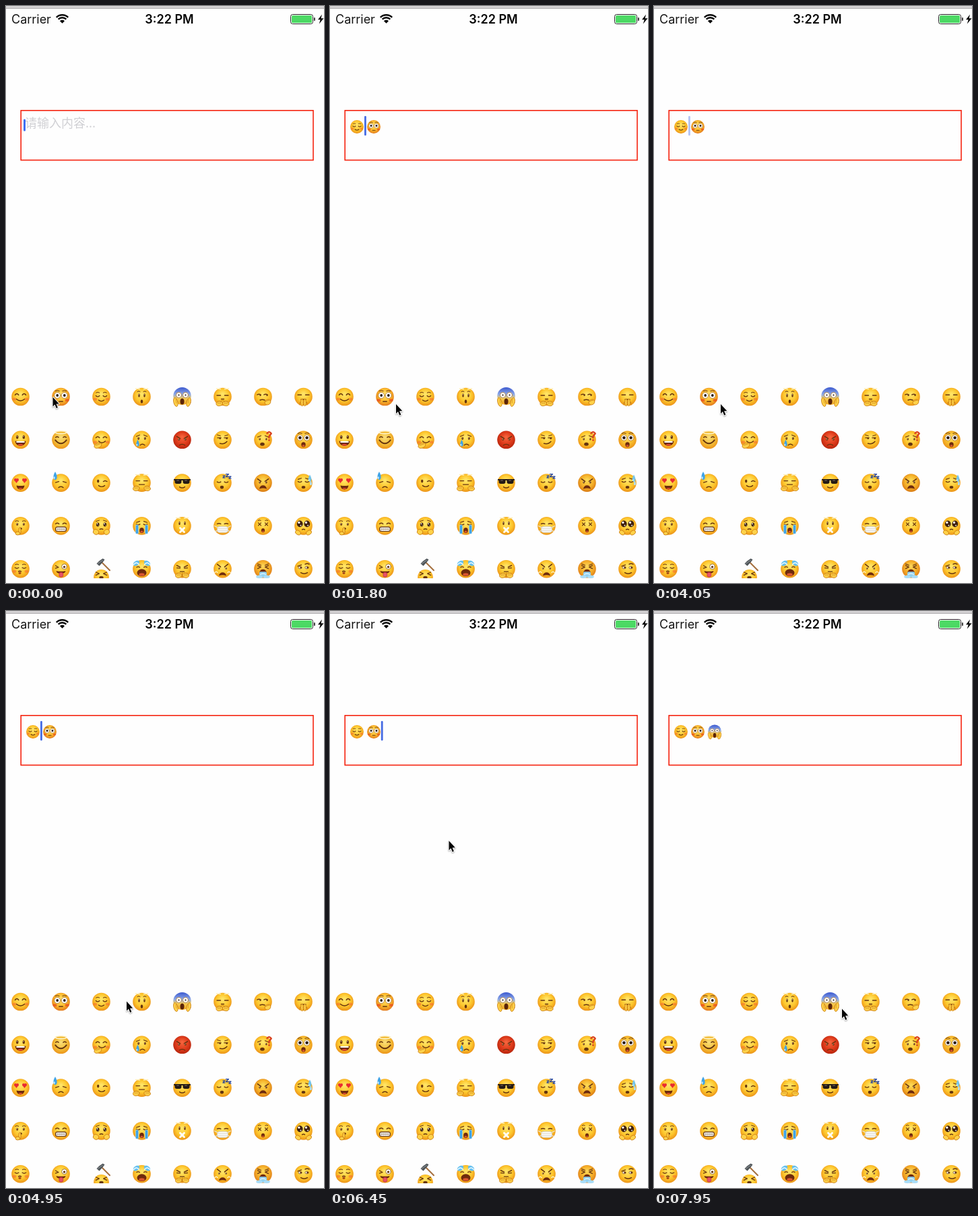
Animation, 472 px wide and 855 px high, one loop 8000 ms. Source, as an HTML page with a canvas:

```html
<!DOCTYPE html>
<html lang="zh">
<head>
<meta charset="utf-8">
<title>Emoji input</title>
<style>
html, body { margin: 0; width: 472px; height: 855px; overflow: hidden; background: #fefefe; }
canvas { display: block; }
</style>
</head>
<body>
<canvas id="stage" width="472" height="855"></canvas>
<script>
const W = 472, H = 855, LOOP = 8000, STEP = 150;
const stage = document.getElementById('stage');
let c = stage.getContext('2d');
const INK = '#65340f', MOUTH = '#6e2a0d', RIM = '#c97c12', SKIN = '#ffd24a', BLUE = '#3fa3e6', PALE = '#a9dcf7';

// drawing helpers
const twice = f => [-1, 1].forEach(f);
function blob(x, y, rx, ry, fill, edge, w = 0.8, rot = 0) {
  c.beginPath();
  c.ellipse(x, y, rx, ry, rot, 0, Math.PI * 2);
  if (fill) { c.fillStyle = fill; c.fill(); }
  if (edge) { c.strokeStyle = edge; c.lineWidth = w; c.stroke(); }
}
function trace(pts) {
  c.beginPath();
  for (let i = 0; i < pts.length; i += 2) c.lineTo(pts[i], pts[i + 1]);
}
function line(color, w, ...pts) {
  trace(pts);
  c.strokeStyle = color; c.lineWidth = w; c.stroke();
}
function poly(color, ...pts) {
  trace(pts);
  c.closePath(); c.fillStyle = color; c.fill();
}
function curve(x, y, w, sag, color = INK, lw = 1.4) {
  c.beginPath();
  c.moveTo(x - w, y);
  c.quadraticCurveTo(x, y + 2 * sag, x + w, y);
  c.strokeStyle = color; c.lineWidth = lw; c.stroke();
}
function bar(x, y, w, h, r, fill, edge, lw = 1) {
  c.beginPath();
  c.roundRect(x, y, w, h, r);
  if (fill) { c.fillStyle = fill; c.fill(); }
  if (edge) { c.strokeStyle = edge; c.lineWidth = lw; c.stroke(); }
}
function text(s, x, y, font, color, align = 'left') {
  c.font = font; c.fillStyle = color; c.textAlign = align;
  c.fillText(s, x, y);
}

// face parts
function head(inner = '#ffe467', mid = '#fdc62c', rim = '#ec9419', y = 0, r = 13.3) {
  const g = c.createRadialGradient(0, y - 4, 1, 0, y - 1, r + 1);
  g.addColorStop(0, inner); g.addColorStop(0.62, mid); g.addColorStop(1, rim);
  blob(0, y, r, r, g);
}
const dots = (rx = 1.6, ry = 2.4, y = -3, dx = 4.8) => twice(s => {
  blob(s * dx, y, rx, ry, INK);
  blob(s * dx - 0.4, y - ry * 0.4, 0.5, 0.6, '#fff');
});
const lids = (sag, y = -2.5, dx = 5.4, w = 2.7) => twice(s => curve(s * dx, y, w, sag));
const brows = (y, tilt = 0, w = 1.2) => twice(s => line(INK, w, s * 3, y + tilt, s * 8, y - tilt));
const arches = (y, w = 2.5) => twice(s => curve(s * 5.3, y, w, -0.8, INK, 1));
const goggle = (r, pupil, y = -2, dx = 5.3) => twice(s => {
  blob(s * dx, y, r, r, '#fff', '#a8702a', 0.8);
  blob(s * dx, y, pupil, pupil, '#2a1a10');
});
const glossy = (rx, ry, y) => twice(s => {
  blob(s * 5.3, y, rx, ry, '#41220f');
  blob(s * 5.3 - rx * 0.3, y - ry * 0.4, rx * 0.36, ry * 0.34, '#fff');
  blob(s * 5.3 + rx * 0.3, y + ry * 0.5, rx * 0.2, ry * 0.2, '#fff');
});
const blush = (color = 'rgba(245,95,50,.5)', y = 3.5) => twice(s => blob(s * 9, y, 3, 2, color));
const hand = (x, y, rx, ry, rot = 0) => blob(x, y, rx, ry, SKIN, RIM, 0.9, rot);
const open = (y, rx, ry) => {
  blob(0, y, rx, ry, MOUTH);
  blob(0, y + ry * 0.5, rx * 0.6, ry * 0.38, '#d9552f');
};
function grin(y, w, h, teeth = true) {
  c.beginPath();
  c.moveTo(-w, y);
  c.quadraticCurveTo(0, y + 1, w, y);
  c.bezierCurveTo(w * 0.9, y + h * 1.3, -w * 0.9, y + h * 1.3, -w, y);
  c.fillStyle = MOUTH; c.fill();
  blob(0, y + h * 0.75, w * 0.45, h * 0.2, '#d9452f');
  if (teeth) bar(-w * 0.8, y + 0.5, w * 1.6, 2, 1, '#fff');
}
// downturned open mouth, resting on y
function snarl(y, w, h) {
  c.beginPath();
  c.moveTo(-w, y);
  c.bezierCurveTo(-w * 0.8, y - h * 1.3, w * 0.8, y - h * 1.3, w, y);
  c.quadraticCurveTo(0, y - h * 0.4, -w, y);
  c.fillStyle = MOUTH; c.fill();
}
function drop(x, y, r, color = BLUE) {
  c.beginPath();
  c.moveTo(x, y - r * 2);
  c.bezierCurveTo(x + r * 2, y + r * 1.5, x - r * 2, y + r * 1.5, x, y - r * 2);
  c.fillStyle = color; c.fill();
  blob(x - r * 0.3, y, r * 0.25, r * 0.4, '#c6ecff');
}
function heart(x, y) {
  twice(s => blob(x + s * 1.5, y - 1, 2, 2, '#e92b32'));
  poly('#e92b32', x - 3.3, y - 0.3, x + 3.3, y - 0.3, x, y + 3.8);
}
const cross = (x, y, r, color, w) => {
  line(color, w, x - r, y - r, x + r, y + r);
  line(color, w, x + r, y - r, x - r, y + r);
};
const squint = y => twice(s => line(INK, 1.3, s * 8, y - 2.2, s * 3.2, y, s * 8, y + 2.2));
const fists = (x = 6, y = 9) => twice(s => {
  hand(s * x, y, 4.8, 3.6, s * 0.2);
  for (let i = -1; i < 2; i++) line(RIM, 0.6, s * x + i * 2, y - 2.4, s * x + i * 2, y + 0.5);
});
const fringe = () => twice(s => line('#fff0b8', 1.5, s * 3, -11.5, s * 9, -12));
const slits = (y = -2) => twice(s => line(INK, 1.4, s * 3, y, s * 8.5, y));
const flat = (y = 5, w = 3) => line(INK, 1.3, -w, y, w, y);

const FACES = [
  // row 1
  () => { head(); blush(); lids(-2); curve(0, 3.5, 6, 2.6); },
  () => {
    head('#ffe06a', '#fcbc2c', '#e37a1c'); blush('rgba(232,60,30,.6)', 5);
    arches(-8.5, 3); goggle(4.5, 1.9); flat(7, 2.8);
  },
  () => { head(); blush(); arches(-6); lids(1.4, -1.5); curve(0, 5, 4, 1.6); },
  () => { head(); fringe(); twice(s => curve(s * 4.5, -7.5, 2, -0.8, INK, 1)); dots(1.3, 2.8, -2, 4); blob(0, 7, 1.8, 2.8, INK); },
  () => {
    const g = c.createLinearGradient(0, -14, 0, 13);
    g.addColorStop(0, '#3c59cf'); g.addColorStop(0.4, '#8fabe8');
    g.addColorStop(0.62, '#f6cb52'); g.addColorStop(1, '#f0a41e');
    blob(0, -1, 13.2, 13, g);
    goggle(4, 1.1, -2.5, 5); blob(0, 7, 3, 4.6, '#5b2409');
    twice(s => { hand(s * 9.6, 8, 3, 6.6, s * 0.25); line(RIM, 0.6, s * 9.3, 3.5, s * 8.8, 9.5); });
  },
  () => { head(); fringe(); slits(); flat(3.5, 2); fists(4.8, 10); line(RIM, 1, -3, 7, 0, 5, 3, 7); },
  () => {
    head(); twice(s => curve(s * 5 - 1, -3, 2.8, -0.8)); blob(-4, -2, 1.2, 1, INK); blob(6, -2, 1.2, 1, INK);
    curve(-1, 5, 3.5, -0.7); hand(7, 8, 4.6, 3.8, -0.5); line(RIM, 0.8, 3, 7, 9, 5);
  },
  () => {
    head(); slits(-2.8); flat(4, 3.5);
    twice(s => hand(s * 2.1, 8.5, 1.8, 5.2)); twice(s => line(RIM, 0.8, s * 5, 8, s * 6, 12));
  },
  // row 2
  () => { head(); dots(1.8, 2.8, -4); grin(1.8, 8, 7.5); },
  () => { head('#f9dc74', '#f2bd38'); blob(0, -11, 8.5, 2, null, '#fff6cf', 1.5); lids(-1, -3.5, 5.6, 2.2); curve(0, 0.5, 8.2, 5, INK, 2); },
  () => { head(); blush(); lids(-1.6, -3); curve(1, 2, 5, 2.5); hand(-5, 8.5, 5.8, 3.6, -0.4); line(RIM, 0.8, -8, 8, -2, 6); },
  () => { head(); brows(-6, -1); dots(1.5, 2, -2); curve(1, 8, 3.4, -1.6); drop(-6, 7.5, 3.8); },
  () => { head('#f5633c', '#dd3a1a', '#b8260e'); brows(-3.4, 1.5, 1.6); dots(1.4, 1.4, -0.4); curve(0, 8, 4, -1.4); },
  () => {
    head(); brows(-6.5, 0.7, 1);
    twice(s => { line(INK, 1.2, s * 5 - 2.7, -3, s * 5 + 2.7, -3); blob(s * 5 + 1.2, -2, 1.3, 1.2, INK); });
    c.beginPath(); c.moveTo(-4, 5.5); c.quadraticCurveTo(3, 7, 6.5, 2.5);
    c.strokeStyle = INK; c.lineWidth = 1.4; c.stroke();
  },
  () => {
    head(); brows(-5, -1); dots(1.3, 1.8, -1); blob(-1, 6.5, 3.3, 2.5, INK);
    curve(9, -9.5, 3, -2.2, '#d9431e', 2.4); line('#d9431e', 2.4, 12, -9, 9, -5, 9, -3); blob(9, 0.5, 1.4, 1.4, '#d9431e');
  },
  () => { head('#ffdf63', '#f6b92b'); arches(-9.5, 3); goggle(4.3, 2.3, -3, 5.1); open(7, 3.2, 3.6); },
  // row 3
  () => { head(); twice(s => heart(s * 6, -3.5)); grin(4, 6, 6, false); },
  () => { head(); twice(s => line(INK, 1.3, s * 3, -2, s * 8, -0.5)); curve(0, 7, 3.5, -1.3); drop(-8.5, -7.5, 4.6); },
  () => { head(); blob(-4.8, -2.5, 1.7, 2.3, INK); line(INK, 1.4, 3, -2, 5.5, -3.2, 8.5, -2); curve(0.5, 4, 4.6, 1.8); },
  () => { head(); fringe(); slits(-3); flat(2.5, 4); fists(8.2, 8.2); },
  () => {
    head(); bar(-12.5, -5.5, 25, 1.8, 0.6, '#241a15');
    twice(s => { bar(s * 6 - 5, -5.5, 10, 7, 3, '#241a15'); line('#86786a', 0.9, s * 6 - 2, -3.5, s * 6 + 1, -3.5); });
    curve(0, 6, 4, 1.4);
  },
  () => {
    head(); lids(1, -1.5); blob(-1, 6.5, 2.7, 2.3, INK);
    [[2, -9, 3], [7, -11, 4], [11, -8, 3]].forEach(([x, y, r]) =>
      line('#26469f', 1.4, x - r / 2, y - r / 2, x + r / 2, y - r / 2, x - r / 2, y + r / 2, x + r / 2, y + r / 2));
  },
  () => { head('#fbd753', '#f5b028', '#da7c14'); brows(-4, 1.8, 1.6); dots(1.4, 1.6, -0.8); snarl(9, 5.5, 5.5); },
  () => { head(); brows(-6, -0.8); lids(1, -2); blob(0, 6.5, 2.8, 2, INK); drop(9.5, -4, 4, '#73c5ec'); drop(11, 2, 2.5, PALE); },
  // row 4
  () => { head(); arches(-7); dots(1.5, 1.9, -2.5); blob(0, 4, 2.4, 1.6, INK); hand(-1, 7.5, 1.7, 5.3); hand(-4, 11, 3.4, 2.5); },
  () => {
    head(); lids(-1.2, -3); bar(-8, 1.5, 16, 6.6, 3, '#fff', INK, 1.1); line('#8d775e', 0.7, -7.5, 4.8, 7.5, 4.8);
    for (let x = -4.5; x < 6; x += 3) line('#8d775e', 0.6, x, 2, x, 7.6);
  },
  () => { head(); brows(-7.5, -0.8, 1); glossy(2.3, 2.8, -2); curve(0, 5, 2.3, -0.7); twice(s => hand(s * 8, 9, 4.3, 3.8, -s * 0.5)); },
  () => { head(); brows(-6, -0.8); lids(1, -2.5); twice(s => bar(s * 7 - 2, -1.5, 4, 13.2, 1.5, BLUE, PALE, 0.6)); open(6.5, 3.3, 4); },
  () => { head(); fringe(); dots(1.2, 2.7, -4, 4); cross(0, 6, 3, '#fff', 2.8); },
  () => {
    head(); lids(-0.7, -3); twice(s => { line('#e7e7e2', 1.1, s * 12, 0, s * 7, 2.5); line('#e7e7e2', 1.1, s * 11, 8, s * 7, 7); });
    bar(-8, 0.8, 16, 9, 3.5, '#f8f8f5', '#c9c5b9', 0.7); line('#d4d1c8', 0.7, -7, 4, 7, 4); line('#d4d1c8', 0.7, -7, 7, 7, 7);
  },
  () => { head(); arches(-8, 2); twice(s => cross(s * 5, -2.5, 2, INK, 1.2)); open(6.7, 2.6, 3); },
  () => { head(); glossy(4.4, 4.8, -3); curve(0, 5.5, 2, -0.7); twice(s => hand(s * 8, 10, 4.3, 3, -s * 0.5)); },
  // row 5
  () => { head(); blush(); arches(-6.5); lids(1, -2); curve(-1, 3.7, 2, -0.7); blob(-1, 6, 2, 1.8, '#a94818'); },
  () => { head(); line(INK, 1.3, -8, -5, -3.5, -2.5, -8, -1); blob(5, -3.5, 3.8, 3.8, '#fff', '#8a5a20'); blob(5, -3, 1.6, 1.6, INK); grin(3, 7, 4, false); bar(-2.7, 5, 6, 7, 3, '#e85263', '#b92e43', 0.7); },
  () => {
    head(undefined, undefined, undefined, 12, 11.3); squint(7); blob(0, 12.5, 3.2, 2, INK);
    line('#a5703f', 2, 0, -10.5, 12.5, 2);
    poly('#50565a', -7, -8, -3, -12, 2, -15.5, 5, -14, 2.5, -10.5, -3, -4.5);
    line('#9ba1a4', 0.9, -5, -8, 2, -13);
  },
  () => {
    head(); twice(s => { blob(s * 8, -8.5, 5.2, 3.4, '#65c0ef', null, 0, s * 0.6); curve(s * 8, -6.5, 4, -2.6, '#e4f6ff', 1.6); });
    lids(-0.8, -2.5, 5.4, 2.2); open(5.5, 7, 5.4);
  },
  () => { head(); brows(-4, 1.2, 1.5); twice(s => line(INK, 1.2, s * 3, -1, s * 8, -1.5)); flat(4, 3); fists(5.2, 9.5); line(RIM, 0.9, 0, 5, 0, 12); },
  () => { head(); brows(-5, 2, 1.5); dots(1.3, 1.3, -0.8, 5.2); snarl(10, 5.5, 5); twice(s => curve(s * 9.5, 5.5, 2, -1.5, '#fff3c1', 1.5)); },
  () => {
    head('#fbd356', '#f4ad28', '#e07f1a'); brows(-6.5, 1); squint(-2.8); snarl(6, 5.5, 5.5);
    bar(-5.5, 4, 11, 8.5, 2, '#8fd0f0'); twice(s => blob(s * 5.5, 11.5, 4.8, 2.2, PALE));
    curve(0, 8, 4, -1, '#eefaff', 1.2);
  },
  () => {
    head(); line(INK, 1.3, -8.5, -4, -3, -6); curve(5.5, -7, 3, -0.9);
    twice(s => { blob(s * 5, -2, 2.6, 1.7, '#fff', INK, 0.7); blob(s * 5 + 1.2, -2, 1.3, 1.4, INK); }); curve(1, 5.5, 5, 1.5);
  }
];

function emoji(i, x, y, scale = 1) {
  c.save();
  c.translate(x, y);
  c.scale(scale, scale);
  c.lineCap = c.lineJoin = 'round';
  FACES[i]();
  c.restore();
}

function statusBar() {
  c.fillStyle = '#d5d3d5'; c.fillRect(0, 0, W, 3);
  c.fillStyle = '#aaa8aa'; c.fillRect(0, 3, W, 1);
  text('Carrier', 8, 26, '400 18px Inter, sans-serif', '#151515');
  text('3:22 PM', 242.5, 26, '600 18px Inter, sans-serif', '#050505', 'center');
  // wifi fan
  c.strokeStyle = '#050505'; c.lineWidth = 2.4;
  [12.3, 8.3].forEach(r => {
    c.beginPath(); c.arc(83.5, 25.5, r, -Math.PI * 0.75, -Math.PI * 0.25); c.stroke();
  });
  c.beginPath(); c.moveTo(83.5, 25.8); c.arc(83.5, 25.8, 5, -Math.PI * 0.75, -Math.PI * 0.25);
  c.fillStyle = '#050505'; c.fill();
  // battery
  bar(422.5, 12.5, 33, 14, 3, '#fff', '#222', 1);
  bar(424, 14, 30, 11, 1.6, '#4cd964');
  bar(457, 17, 1.8, 5, 0.9, '#222');
  poly('#050505', 469, 12.5, 463, 20.3, 466.6, 20.3, 464.8, 26.5, 471.5, 18.2, 467.6, 18.2);
}

function buildScene() {
  const sheet = document.createElement('canvas');
  sheet.width = W; sheet.height = H;
  const main = c;
  c = sheet.getContext('2d');
  c.fillStyle = '#fefefe'; c.fillRect(0, 0, W, H);
  statusBar();
  c.strokeStyle = '#f5230f'; c.lineWidth = 1.6;
  c.strokeRect(22.2, 154.8, 433.8, 73.6);
  c.save();
  c.beginPath(); c.rect(0, 0, W, 848); c.clip();
  FACES.forEach((_, i) => emoji(i, 21.5 + 60 * (i % 8), 579 + 63.8 * Math.floor(i / 8)));
  c.restore();
  c = main;
  return sheet;
}

// each blink passes through one half-faded step; the first turns the caret off
const fades = (...times) => times.flatMap((t, i) => [[t, 0.4], [t + STEP, i % 2]]);
const CARET = [
  [0, 1], [300, 0], [450, 1],
  ...fades(1050, 1500, 2100, 2550, 3000, 3600, 4050, 4500, 5100, 5550),
  [6000, 1], ...fades(6600), [7350, 1], ...fades(7800)
];
const PATH = [
  [0, 69, 579], [1050, 69, 579], [1350, 82, 586], [1800, 97.5, 589.5], [2550, 97.5, 589.5], [2700, 98.5, 589.5],
  [4050, 98.5, 589.5], [4350, 119, 596], [4650, 160, 590], [4950, 178.5, 578], [5100, 178.5, 578],
  [5250, 198, 540], [5400, 208, 430], [5550, 180, 290], [5700, 130, 210], [5850, 110.5, 178.5],
  [6000, 107, 176], [6150, 107, 177], [6300, 128, 215], [6450, 176, 340], [6600, 224, 490],
  [6750, 245, 572], [6900, 253, 592], [7050, 256, 582], [7500, 256, 582], [7950, 278.5, 589]
];

function pointerAt(t) {
  const n = PATH.findIndex(k => k[0] > t);
  if (n < 0) return PATH[PATH.length - 1].slice(1);
  const a = PATH[n - 1], b = PATH[n], p = (t - a[0]) / (b[0] - a[0]);
  return [a[1] + (b[1] - a[1]) * p, a[2] + (b[2] - a[2]) * p];
}

function drawCaret(t) {
  c.globalAlpha = CARET.filter(k => k[0] <= t).pop()[1];
  if (t < 300) bar(26, 167.5, 3, 18, 1.5, '#3e70f4');
  else bar(t >= 6000 && t < 7200 ? 75.8 : 51, 163, 2.8, 29, 1.2, '#456be3');
  c.globalAlpha = 1;
}

function drawPointer(t) {
  const [x, y] = pointerAt(t);
  c.save();
  c.translate(x, y);
  c.shadowColor = 'rgba(0,0,0,.35)'; c.shadowBlur = 2; c.shadowOffsetY = 1;
  const shape = [0.5, 0.5, 0.5, 14.5, 3.5, 11.6, 5.7, 17, 7.9, 16, 5.6, 10.8, 9.8, 10.6];
  c.lineJoin = 'round';
  line('#fff', 2, ...shape, 0.5, 0.5);
  c.shadowColor = 'transparent';
  poly('#050505', ...shape);
  c.restore();
}

function draw(t) {
  c.drawImage(scene, 0, 0);
  if (t < 300) {
    text('请输入内容...', 28, 180, '300 18px "Noto Sans CJK SC", "Noto Sans CJK", sans-serif', '#d0d0d4');
  } else {
    [2, 1, 4].slice(0, t < 7200 ? 2 : 3).forEach((f, i) => emoji(f, 40 + 25 * i, 179, 0.75));
  }
  drawCaret(t);
  drawPointer(t);
}

const scene = buildScene();
function tick() {
  draw(Math.floor(performance.now() % LOOP / STEP) * STEP);
  requestAnimationFrame(tick);
}
tick();
</script>
</body>
</html>
```
